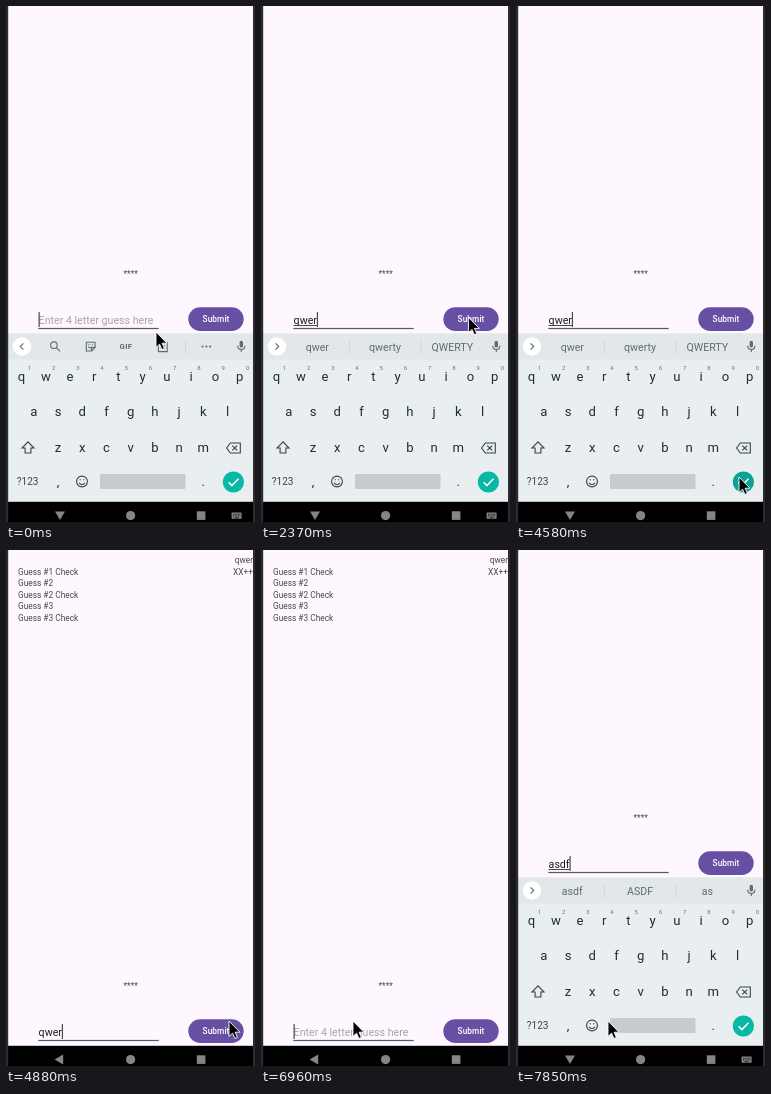
Write an HTML page that moves like this. It is 249 px wide and 516 px high and loops after 8000 ms.

```html
<!DOCTYPE html>
<html lang="en">
<head>
<meta charset="utf-8">
<title>Word guess</title>
<style>
  html, body { margin: 0; width: 100%; height: 100%; overflow: hidden; background: #fef7ff; }
  svg { display: block; width: 100vw; height: 100vh; font-family: Roboto, sans-serif; }
  .small { font-size: 8.33px; fill: #49454f; }
  .field { font-size: 10.65px; fill: #1d1b20; }
  .mid { text-anchor: middle; }
  .end { text-anchor: end; }
  .key { font-size: 13.1px; fill: #1f2d34; text-anchor: middle; }
  .digit { font-size: 6px; fill: #66737a; text-anchor: middle; }
  .word { font-size: 10.6px; fill: #5f6b71; text-anchor: middle; }
  .line { fill: none; stroke: #5f6b71; stroke-width: 1.1; }
  .dark { stroke: #37444b; }
  .solid { fill: #5f6b71; }
  .rule { stroke: #cdd3d6; stroke-width: .8; }
  .nav { fill: #858585; }
</style>
</head>
<body>
<svg id="stage" viewBox="0 0 249 516" preserveAspectRatio="none">
  <defs><clipPath id="pill"><rect x="182.3" y="301.2" width="55.4" height="23.8" rx="11.9"/></clipPath></defs>
  <rect width="249" height="516" fill="#fef7ff"/>

  <g id="history"></g>

  <g id="form">
    <text class="small mid" x="124.7" y="270.7">****</text>
    <text id="hint" class="field" x="32.6" y="318" style="fill:#a8a2ac">Enter 4 letter guess here</text>
    <text id="typed" class="field" x="32.6" y="318"></text>
    <rect id="compose" x="32.6" y="319.2" height=".8" fill="#1d1b20"/>
    <rect x="32.3" y="321.9" width="120.4" height="1.2" fill="#5c5563"/>
    <rect id="caret" y="306" width="1.2" height="15" fill="#4f4858"/>
    <g clip-path="url(#pill)">
      <rect x="182" y="301" width="56" height="25" fill="#6750a4"/>
      <circle id="ripple" cx="212" cy="313" fill="#fff" opacity=".27"/>
    </g>
    <text class="mid" x="210" y="316.4" font-size="8.33" font-weight="500" letter-spacing=".06" fill="#fff">Submit</text>
  </g>

  <g id="keyboard">
    <rect y="327.5" width="249" height="170" fill="#e9eef0"/>
    <rect y="327.5" width="249" height="26" fill="#e2e7ea"/>
    <circle cx="16" cy="340.5" r="9.3" fill="#fff"/>
    <path id="chevron" class="line" stroke-width="1.3"/>
    <g id="tools">
      <circle class="line" cx="47.9" cy="339.2" r="3.3"/>
      <path class="line" d="M50.3 341.6l3.8 3.8"/>
      <path class="line" d="M80.3 336.2h8.8v5.4l-3.4 3.4h-5.4zM89 341.4h-3.4v3.4M82.3 340.6q1.6 2.2 3.2 .6"/>
      <path class="line" d="M82.5 338.6h1M85.8 338.6h1"/>
      <text class="mid solid" x="120" y="343.2" font-size="7.8" font-weight="700" letter-spacing=".3">GIF</text>
      <path class="line" d="M152.4 336.6h8.8v9h-8.8zM155 336.6v-1.4h3.6v1.4M154.6 339.8h4.4M154.6 342.2h4.4"/>
      <path class="rule" d="M179.5 334v13"/>
      <g class="solid"><circle cx="196.6" cy="340.5" r="1.1"/><circle cx="200.4" cy="340.5" r="1.1"/><circle cx="204.2" cy="340.5" r="1.1"/></g>
    </g>
    <g id="words">
      <path class="rule" d="M88.5 334v13M160 334v13"/>
      <text class="word" x="56.3" y="344.6"></text>
      <text class="word" x="124" y="344.6"></text>
      <text class="word" x="191.3" y="344.6"></text>
    </g>
    <rect class="solid" x="233.6" y="334.8" width="3.4" height="6.8" rx="1.7"/>
    <path class="line" d="M231.7 339.8q0 3.7 3.6 3.7t3.6-3.7M235.3 343.5v2.4"/>
    <g id="keys"></g>
    <path class="line dark" d="M22 435.8l-6 6.2h3.1v5h5.8v-5h3.1z"/>
    <path class="line dark" d="M220.6 442l3.7-5h10v10h-10zM226.3 439.6l4.8 4.8M231.1 439.6l-4.8 4.8"/>
    <text class="mid" x="21.6" y="479.3" font-size="10" fill="#37444b">?123</text>
    <circle class="line dark" cx="76" cy="475.5" r="5.4"/>
    <path class="line dark" d="M73.1 476.8q2.9 3.8 5.8 0M73.6 473.8h1.2M77.2 473.8h1.2"/>
    <rect x="94" y="468" width="85.5" height="15" rx="1.2" fill="#c6cbcd"/>
    <circle id="enter" cx="227.4" cy="476" r="10.6"/>
    <path d="M222.6 476.3l3.3 3.3 6.6-6.8" fill="none" stroke="#fff" stroke-width="1.5"/>
  </g>

  <rect y="495.8" width="249" height="21" fill="#000"/>
  <path id="back" class="nav"/>
  <circle class="nav" cx="124.6" cy="509.6" r="4.6"/>
  <rect class="nav" x="190.8" y="505.3" width="8.6" height="8.6"/>
  <g id="switcher">
    <rect x="225.6" y="506.4" width="10" height="6.4" rx=".8" fill="#858585"/>
    <path d="M227 508.3h7.4M227 510h7.4" stroke="#000" stroke-width=".8" stroke-dasharray="1 .6"/>
    <path d="M228.6 511.7h4" stroke="#000" stroke-width=".7"/>
  </g>

  <rect width="2.2" height="516" fill="#2b2c31"/>
  <rect x="247" width="2" height="516" fill="#2b2c31"/>
  <path id="pointer" d="M0 0V15.4L3.6 12.2 5.9 17.5 8.4 16.4 6.1 11.2H10.9Z" fill="#000" stroke="#fff" stroke-width=".9" stroke-linejoin="round"/>
</svg>

<script>
const LOOP = 8000, TICKS = 54, LEAD = 14;
const $ = id => document.getElementById(id);
const show = (id, on) => $(id).setAttribute('visibility', on ? 'inherit' : 'hidden');
const set = (id, attrs) => { for (const k in attrs) $(id).setAttribute(k, attrs[k]); };
const text = (cls, x, y, s) => `<text class="${cls}" x="${x}" y="${y}">${s}</text>`;

function buildKeys() {
  const rows = [['qwertyuiop', 15.6, 375.2], ['asdfghjkl', 27.8, 410.4], ['zxcvbnm', 52, 445.8]];
  let out = text('key', 52, 479.6, ',') + text('key', 197.3, 479.6, '.');
  for (const [letters, x0, y] of rows)
    [...letters].forEach((c, i) => {
      const x = x0 + i * 24.22;
      out += text('key', x, y, c);
      if (y < 400) out += text('digit', x + 7.8, 364.2, (i + 1) % 10);
    });
  $('keys').innerHTML = out;
}

function buildHistory() {
  const left = ['Guess #1 Check', 'Guess #2', 'Guess #2 Check', 'Guess #3', 'Guess #3 Check'];
  $('history').innerHTML =
    left.map((s, i) => text('small', 12, 24.5 + i * 11.6, s)).join('') +
    text('small end', 247, 13, 'qwer') + text('small end', 247, 24.5, 'XX++');
}

// [first tick, field text, suggestions]
const typing = [
  [0, ''],
  [7, 'q', 'q Q qu'], [8, 'qwe', 'qwe QWE were'], [10, 'qwer', 'qwer qwerty QWERTY'],
  [44, 'qwe'], [45, 'qw'], [46, 'q'], [47, ''],
  [51, 'a', 'a A as'], [52, 'asd', 'asd ASD as'], [53, 'asdf', 'asdf ASDF as']
];
const caretOff = [[2, 5], [13, 16], [20, 23], [26, 30], [35, 38], [42, 44]];
// [start tick, end tick, x, y, lift]
const moves = [[11, 17, 212, 310, 0], [25, 31, 223, 471, 0], [34, 41, 92, 471, 5]];

const within = (n, a, b) => n >= a && n < b;
const ease = p => p * p * (3 - 2 * p);

function pointerAt(n) {
  let x = 150, y = 326;
  for (const [a, b, tx, ty, lift] of moves) {
    const p = ease(Math.min(1, Math.max(0, (n - a) / (b - a))));
    x += (tx - x) * p;
    y += (ty - y) * p - lift * Math.sin(Math.PI * p);
  }
  return `translate(${x.toFixed(2)} ${y.toFixed(2)})`;
}

function draw(n) {
  const closed = within(n, 33, 51);
  const [, value, words] = typing.filter(s => s[0] <= n).pop();

  show('history', closed);
  show('keyboard', !closed);
  show('switcher', !within(n, 31, 51));
  set('form', { transform: `translate(0 ${closed ? 168 : 0})` });
  set('back', { d: closed ? 'M48.6 509.6l8.6-5v10z' : 'M49 505.4h10l-5 8.6z' });

  $('typed').textContent = value;
  show('hint', !value);
  const width = value ? $('typed').getComputedTextLength() : 0;
  set('compose', { width: closed ? 0 : width });
  set('caret', { x: 32.5 + width });
  show('caret', !caretOff.some(([a, b]) => within(n, a, b)));

  show('tools', !words);
  show('words', !!words);
  set('chevron', { d: words ? 'M14.6 337.3l3.2 3.2-3.2 3.2' : 'M17.4 337.3l-3.2 3.2 3.2 3.2' });
  if (words) {
    const slots = $('words').querySelectorAll('text');
    words.split(' ').forEach((w, i) => slots[i].textContent = w);
  }

  set('ripple', { r: n === 21 ? 16 : n === 22 ? 40 : 0 });
  set('enter', { fill: n === 31 ? '#0aa293' : '#08b8a6' });
  set('pointer', { transform: pointerAt(n) });
}

let last = -1;
function frame(now) {
  const n = Math.min(TICKS - 1, Math.floor((now % LOOP + LEAD) * TICKS / LOOP));
  if (n !== last) draw(last = n);
  requestAnimationFrame(frame);
}

buildKeys();
buildHistory();
draw(0);
requestAnimationFrame(start => {
  const tick = now => { frame0(now - start); requestAnimationFrame(tick); };
  const frame0 = t => {
    const n = Math.min(TICKS - 1, Math.floor((Math.max(0, t) % LOOP + LEAD) * TICKS / LOOP));
    if (n !== last) draw(last = n);
  };
  tick(start);
});
</script>
</body>
</html>
```
